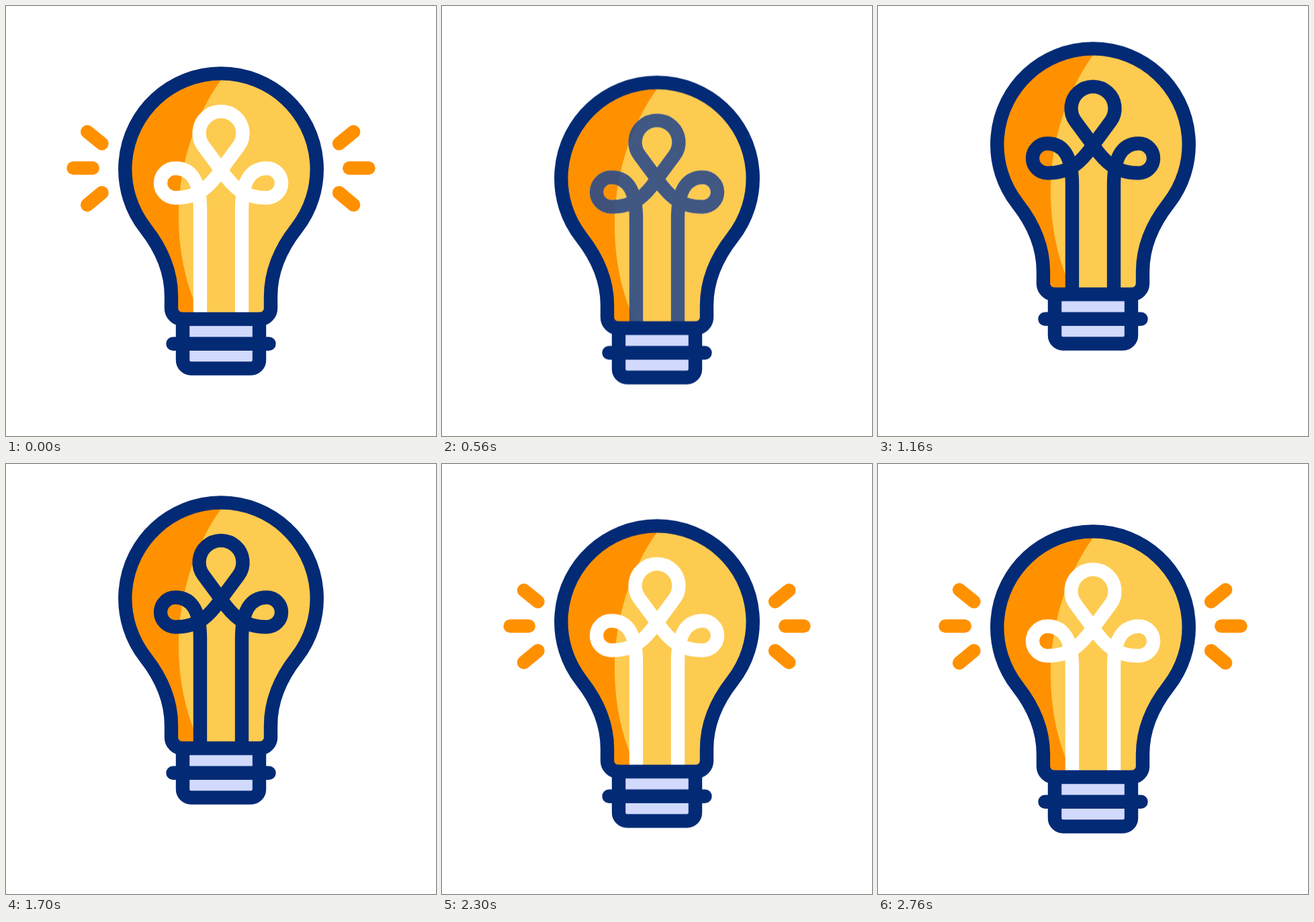
These frames come from a looping animation (640 by 640 pixels, 3000 ms). An HTML page:

```html
<!DOCTYPE html>
<html lang="en">
<head>
<meta charset="utf-8">
<title>Light bulb</title>
<style>
  html, body { margin: 0; width: 100%; height: 100%; overflow: hidden; background: #fff; }
  svg {
    display: block; width: 100vw; height: 100vh;
    --navy: #032a75; --orange: #ff9100; --yellow: #fdcb50; --lilac: #d1dafd;
    --ease: cubic-bezier(.333, 0, .667, 1);
  }
  .line { fill: none; stroke: var(--navy); stroke-width: 20.4; stroke-linecap: round; stroke-linejoin: round; }
  .bulb { animation: hop 3s var(--ease) infinite; }
  .wire { stroke-linecap: butt; }
  .on { stroke: #fff; animation: glow 3s linear infinite; }
  .off { animation: dim 3s linear infinite; }
  .rays { stroke: var(--orange); stroke-width: 20; }
  .rays path { stroke-dasharray: 1 3; animation: shine 3s var(--ease) infinite; }

  @keyframes hop {
    0%, 6.667% { transform: translateY(0); }
    15% { transform: translateY(24px); animation-timing-function: cubic-bezier(.167, 0, 0, 1); }
    57.78% { transform: translateY(-43px); }
    68.333% { transform: translateY(24px); }
    80% { transform: translateY(-16px); }
    92.22%, 100% { transform: translateY(0); }
  }
  @keyframes glow {
    0%, 15% { opacity: 1; }
    23%, 61.5% { opacity: 0; }
    68.333%, 100% { opacity: 1; }
  }
  @keyframes dim {
    0%, 15% { opacity: 0; }
    19.9%, 63.77% { opacity: 1; }
    68.333%, 100% { opacity: 0; }
  }
  @keyframes shine {
    0%, 6.667% { stroke-dashoffset: 0; }
    15%, 68.333% { stroke-dashoffset: 1.01; }
    77.8%, 100% { stroke-dashoffset: 0; }
  }
</style>
</head>
<body>
<svg viewBox="0 0 640 640">
  <defs>
    <path id="glass" d="M207.6 331A142.7 142.7 0 1 1 432.4 331C412 357 394 392 394 432V450A16 16 0 0 1 378 466H262A16 16 0 0 1 246 450V432C246 392 228 357 207.6 331Z"/>
    <path id="wire" d="M289 466V303C289 264 278 241.5 252 241.5A22 22 0 0 0 252 285.5C286 285.5 302 270 320 244L346.1 208.7A32.5 32.5 0 1 0 293.9 208.7L320 244C338 270 354 285.5 388 285.5A22 22 0 0 0 388 241.5C362 241.5 351 264 351 303V466"/>
    <clipPath id="inside"><use href="#glass"/></clipPath>
  </defs>

  <g class="line rays">
    <path pathLength="1" d="M142.7 204.7L121 187.3"/>
    <path pathLength="1" d="M129 241.3H100.3"/>
    <path pathLength="1" d="M142.7 278L121 296"/>
    <path pathLength="1" d="M495.8 204.7L517.3 187.3"/>
    <path pathLength="1" d="M511 241.3H539.7"/>
    <path pathLength="1" d="M495.8 278L517.3 296"/>
  </g>

  <g class="bulb">
    <use href="#glass" fill="var(--yellow)"/>
    <path clip-path="url(#inside)" fill="var(--orange)" d="M327 100L320 110C280 165 257 240 257 312C257 362 266 412 289 460V470H160V100Z"/>
    <use href="#wire" class="line wire on"/>
    <use href="#wire" class="line wire off"/>
    <path class="line" style="fill: var(--lilac)" d="M263 466V527A12.5 12.5 0 0 0 275.5 539.5H364.5A12.5 12.5 0 0 0 377 527V466"/>
    <path class="line" d="M248.5 502.7H391.5"/>
    <use href="#glass" class="line"/>
  </g>
</svg>
</body>
</html>
```
